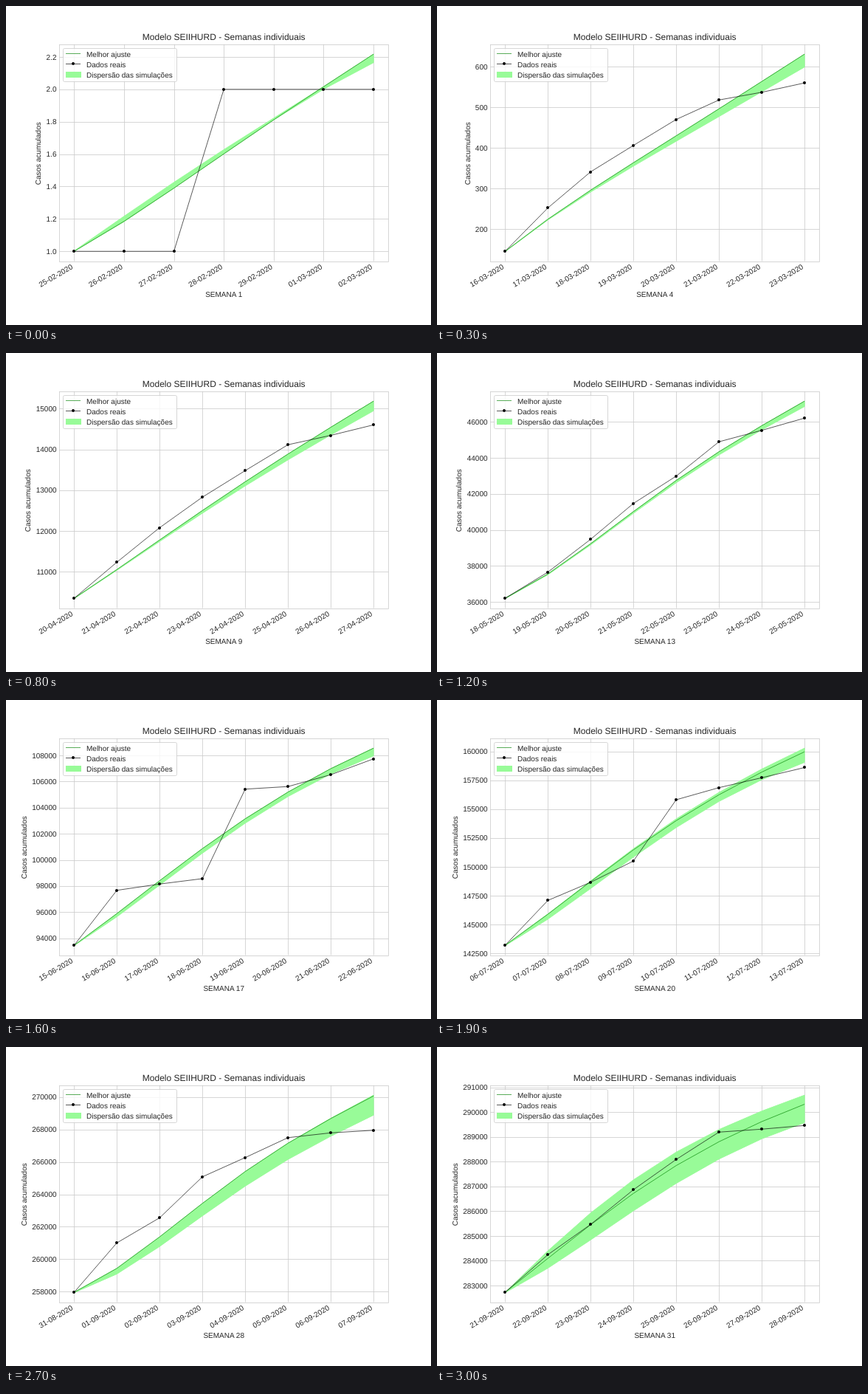
Animation, 576 px wide and 432 px high, one loop 3100 ms. Source, as an HTML page with a canvas:

```html
<!DOCTYPE html>
<html lang="pt">
<head>
<meta charset="utf-8">
<title>Semanas individuais</title>
<style>
  html, body { margin: 0; width: 100%; height: 100%; overflow: hidden; background: #fff; }
  canvas { display: block; }
</style>
</head>
<body>
<canvas id="chart" width="576" height="432"></canvas>
<script>
const ctx = document.getElementById('chart').getContext('2d');
const WEEK_MS = 100, WEEKS = 31;
const BOX = { left: 72, right: 518.4, top: 51.84, bottom: 345.6 };
const INNER = 1 / 1.1, MARGIN = 0.05 / 1.1;
const INK = '#262626', GRID = '#cccccc', BAND = '#98fb98', FIT = '#008000', REAL = '#000';
const RULE = 0.8, THIN = 0.65;
const FONT = '"Liberation Sans", Arial, sans-serif';

// Cumulative cases at the start of each week, and at the end of the last one.
const totals = [
  1, 2, 19, 145, 560, 1233, 3754, 6420, 10350, 14600, 20100, 28000, 36195, 46215, 61000, 76500,
  93450, 107742, 125500, 143200, 158600, 172300, 186500, 200730, 214366, 229200, 245300,
  257957, 267948, 274900, 282723, 289463
];

// Weekly shapes as heights above the first point; fit, low and high are smooth curves.
const FIT_DAYS = [0, 1, 3, 5, 7], GAP_DAYS = [0, 2, 5, 7];
const NONE = [0, 0, 0, 0];
const shapes = {
  1: { real: [0, 0, 0, 219.35, 219.35, 219.35, 219.35],
       fit: [0, 34.5, 112, 191, 267], low: [0, 0, 0.5, 11.5], high: [0.5, 8, 1.5, 0] },
  6: { real: [0, 59, 107.5, 143.5, 178.5, 205, 215.5, 228],
       fit: [0, 43.5, 120, 193, 267], low: [0.5, 2.5, 10.5, 17.5], high: NONE },
  13: { real: [0, 35.5, 80, 128.5, 165.5, 212, 227.5, 244],
        fit: [0, 33, 117.5, 198.5, 267], low: [0.5, 1.7, 4.3, 7.3], high: NONE },
  17: { real: [0, 74.5, 83, 90.3, 211.5, 215, 231, 252.5],
        fit: [0, 43, 131, 207.5, 267], low: [0.5, 6, 6, 10.5], high: NONE },
  24: { real: [0, 42.5, 88.5, 146, 178, 211.5, 221.5, 225],
        fit: [0, 41, 127, 199, 255.5], low: [0.5, 14, 13, 19.5], high: [0, 2, 7.5, 11.5] },
  28: { real: [0, 67, 101, 156.5, 182.5, 209.5, 216, 219.5],
        fit: [0, 32.5, 120.5, 202, 266], low: [0.5, 13, 22, 26], high: [0, 0, 0, 1.1] },
  31: { real: [0, 51, 92, 139, 180, 217, 221, 226],
        fit: [0, 46, 134, 204, 254.8], low: [0.5, 20.5, 23.5, 25], high: [0, 16, 16.5, 12.3] }
};
const anchors = Object.keys(shapes).map(Number);

const mix = (a, b, k) => a.map((v, i) => v + (b[i] - v) * k);

function shapeOf(week) {
  if (shapes[week]) return shapes[week];
  const next = anchors.find(a => a > week);
  const prev = Math.max(6, anchors[anchors.indexOf(next) - 1]);
  if (next <= prev) return shapes[next];
  const a = shapes[prev], b = shapes[next], k = (week - prev) / (next - prev);
  const blend = {};
  for (const part in a) blend[part] = mix(a[part], b[part], k);
  return blend;
}

// Polynomial through the given points.
function curve(xs, ys, x) {
  return ys.reduce((sum, y, i) =>
    sum + xs.reduce((p, xj, j) => j === i ? p : p * (x - xj) / (xs[i] - xj), y), 0);
}

function buildWeek(week) {
  const shape = shapeOf(week), days = shape.real.length - 1;
  const start = totals[week - 1];
  const unit = (totals[week] - start) / shape.real[days];
  const value = h => start + h * unit;
  const data = { days, real: shape.real.map(h => Math.round(value(h))), fit: [], low: [], high: [] };
  for (let d = 0; d <= days; d++) {
    const u = d * 7 / days;
    const h = curve(FIT_DAYS, shape.fit, u);
    const gap = ys => Math.max(0, curve(GAP_DAYS, ys, u));
    data.fit.push(value(h));
    data.low.push(value(h - gap(shape.low)));
    data.high.push(value(h + gap(shape.high)));
  }
  data.min = start;
  data.max = Math.max(...data.real, ...data.fit, ...data.high);
  return data;
}

function tickStep(span) {
  const rough = span / 9, power = 10 ** Math.floor(Math.log10(rough));
  return [1, 2, 2.5, 5, 10].find(m => m * power >= rough) * power;
}

function dayLabel(week, d) {
  const date = week === 1 ? new Date(Date.UTC(2020, 1, 25 + d))
                          : new Date(Date.UTC(2020, 2, 2 + 7 * (week - 2) + d));
  return date.toISOString().slice(0, 10).split('-').reverse().join('-');
}

function setFont(size) {
  ctx.font = `${size}px ${FONT}`;
  ctx.textRendering = 'geometricPrecision';
}

function text(str, x, y, { align = 'left', size = 10, turn = 0 } = {}) {
  ctx.save();
  ctx.translate(x, y);
  ctx.rotate(turn * Math.PI / 180);
  setFont(size);
  ctx.textAlign = align;
  ctx.fillStyle = INK;
  ctx.fillText(str, 0, 0);
  ctx.restore();
}

function trace(points) {
  ctx.beginPath();
  points.forEach(([x, y]) => ctx.lineTo(x, y));
}

function line(points, color, width) {
  trace(points);
  ctx.strokeStyle = color;
  ctx.lineWidth = width;
  ctx.stroke();
}

// Markers sit on whole pixels.
function dot(x, y) {
  ctx.beginPath();
  ctx.arc(Math.round(x), Math.round(y), 2, 0, 2 * Math.PI);
  ctx.fillStyle = REAL;
  ctx.fill();
}

const snap = v => Math.round(v) + 0.5;

function drawLegend() {
  ctx.beginPath();
  ctx.roundRect(77.5, 57.5, 154, 45, 2);
  ctx.fillStyle = 'rgba(255,255,255,0.8)';
  ctx.fill();
  ctx.strokeStyle = 'rgba(204,204,204,0.8)';
  ctx.lineWidth = 1;
  ctx.stroke();
  line([[81, 64.5], [101, 64.5]], FIT, THIN);
  line([[81, 78.5], [101, 78.5]], REAL, THIN);
  dot(91, 78);
  ctx.fillStyle = BAND;
  ctx.fillRect(81, 89, 21, 8);
  ['Melhor ajuste', 'Dados reais', 'Dispersão das simulações']
    .forEach((label, i) => text(label, 109, 68.7 + 14 * i));
}

function draw(week) {
  const data = buildWeek(week);
  const width = BOX.right - BOX.left, height = BOX.bottom - BOX.top;
  const span = data.max - data.min;
  const px = d => BOX.left + width * (MARGIN + INNER * d / data.days);
  const py = v => BOX.bottom - height * (MARGIN + INNER * (v - data.min) / span);
  const path = values => values.map((v, d) => [px(d), py(v)]);

  ctx.fillStyle = '#fff';
  ctx.fillRect(0, 0, 576, 432);

  for (let d = 0; d <= data.days; d++) {
    const x = snap(px(d));
    line([[x, BOX.top], [x, BOX.bottom]], GRID, RULE);
    text(dayLabel(week, d), px(d) - 1.05, 355.3, { align: 'right', turn: -30 });
  }

  const step = tickStep(span * 1.1);
  const decimals = step % 1 ? 1 : 0;
  const bottom = data.min - span * 0.05, top = data.max + span * 0.05;
  let widest = 0;
  setFont(10);
  for (let n = Math.ceil(bottom / step); n * step <= top; n++) {
    const y = py(n * step), label = (n * step).toFixed(decimals);
    line([[BOX.left, snap(y)], [BOX.right, snap(y)]], GRID, RULE);
    text(label, 68.5, Math.round(y + 3.6), { align: 'right' });
    widest = Math.max(widest, ctx.measureText(label).width);
  }

  trace([...path(data.high), ...path(data.low).reverse()]);
  ctx.closePath();
  ctx.fillStyle = ctx.strokeStyle = BAND;
  ctx.lineWidth = 1;
  ctx.fill();
  ctx.stroke();
  line(path(data.fit), FIT, THIN);
  line(path(data.real), REAL, THIN);
  path(data.real).forEach(([x, y]) => dot(x, y));

  ctx.strokeStyle = GRID;
  ctx.lineWidth = RULE;
  ctx.strokeRect(72.5, 52.5, 446, 294);

  text('Modelo SEIIHURD - Semanas individuais', 295.2, 46, { align: 'center', size: 12 });
  text('SEMANA ' + week, 295.2, 394, { align: 'center' });
  text('Casos acumulados', Math.round(61.3 - widest), 199.8, { align: 'center', turn: -90 });
  drawLegend();
}

const startTime = performance.now();
let shown = 0;
function tick(now) {
  const elapsed = Math.max(0, now - startTime);
  const week = Math.floor(elapsed / WEEK_MS) % WEEKS + 1;
  if (week !== shown) draw(shown = week);
  requestAnimationFrame(tick);
}
tick(startTime);
</script>
</body>
</html>
```
